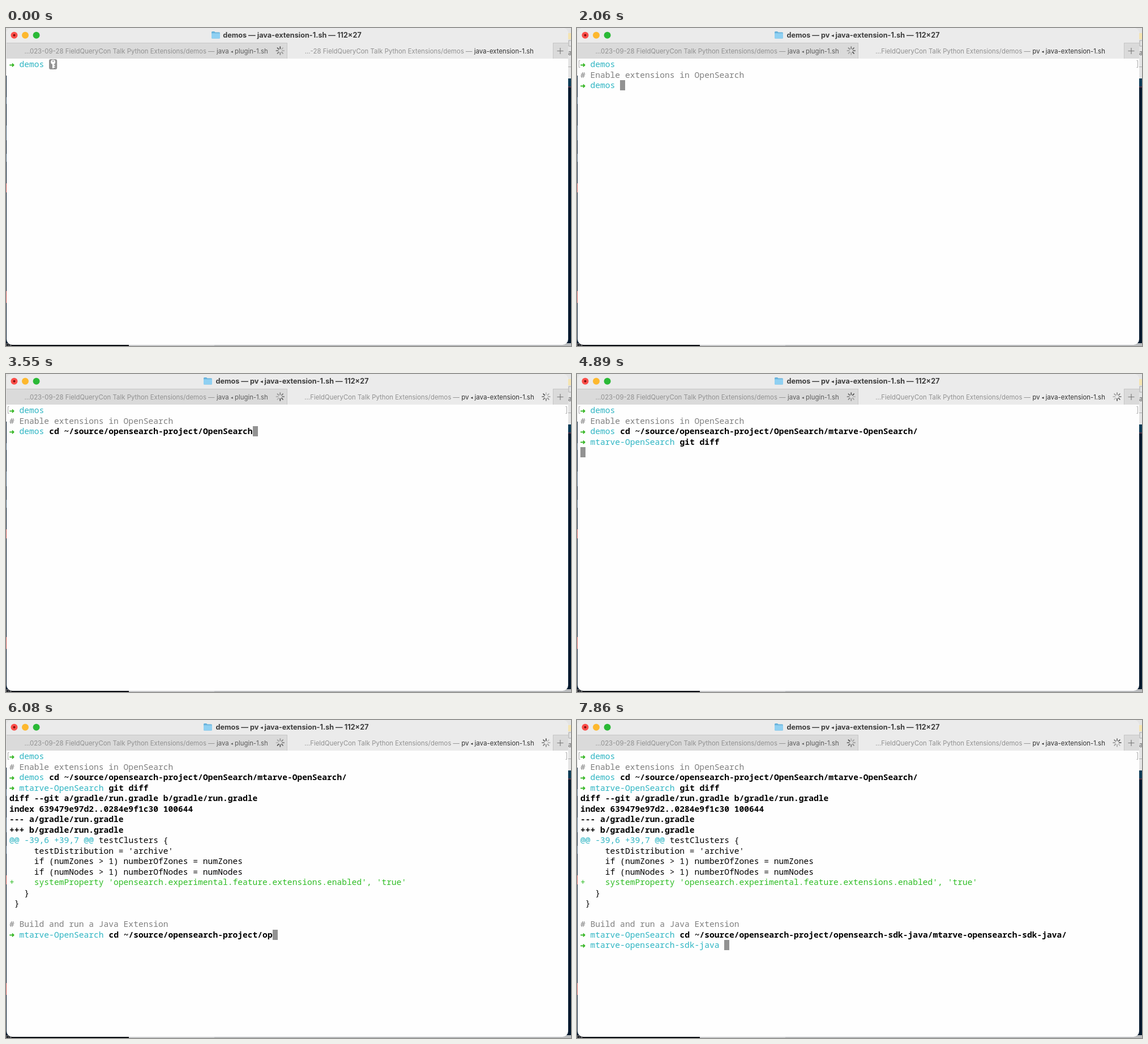
These frames come from a looping animation (998 by 561 pixels, 8000 ms). An HTML page:

```html
<!DOCTYPE html>
<html lang="en">
<head>
<meta charset="utf-8">
<title>Terminal demo</title>
<style>
  html, body { margin: 0; width: 100%; height: 100%; overflow: hidden; }
  svg { display: block; width: 100%; height: 100%; }
  text { white-space: pre; }
  .title { font: 700 12.65px Inter, sans-serif; fill: #3d3d3d; text-anchor: middle; }
  .tab { font: 11.4px Inter, sans-serif; fill: #5c5c5c; }
  .active { fill: #333; }
  .path { fill: #919191; text-anchor: end; }
  .small { font-size: 66%; }
  .term { font: 500 14.617px "Noto Sans Mono", monospace; fill: #000; }
  .arrow { font: 11.6px "DejaVu Sans", sans-serif; fill: #2fb41d; stroke: #2fb41d; stroke-width: 0.3; }
  .term.bold { font-weight: 700; }
  .term.cyan { fill: #2eb5c3; }
  .term.green { fill: #2fbd25; }
  .term.gray { fill: #7f7f7f; }
</style>
</head>
<body>
<svg viewBox="0 0 998 561">
  <!-- desktop behind the window -->
  <rect width="998" height="561" fill="#02182d"/>
  <path d="M0 0H12V84H0zM980 0H998V89H980z" fill="#e4e4e4"/>
  <path d="M993 9H998V20H993z" fill="#f5e4b0"/>
  <path d="M998 22H994V32H998M993 68.5H998" fill="none" stroke="#aaa"/>
  <text class="tab" x="993" y="48">a</text>
  <rect x="993" y="89" width="5" height="14" fill="#0b3a55"/>
  <path d="M993 104H998" stroke="#a04a60"/>
  <path d="M0 274h2v16h-2zM0 464h2v21h-2z" fill="#c85a55"/>
  <path d="M0 122h2v12h-2zM0 172h2v26h-2zM0 222h2v14h-2z" fill="#48627a"/>
  <rect y="556" width="217" height="5" fill="#06090f"/>
  <path d="M217 556H998V561H217z" fill="#c9cacc"/>
  <path d="M368 556H998V561H368z" fill="#b9bbbd"/>
  <text x="0" y="561" font-size="9" font-family="Inter, sans-serif" fill="#aaa">ns</text>

  <!-- window -->
  <clipPath id="frame"><rect x="1" width="992" height="559" rx="10"/></clipPath>
  <g clip-path="url(#frame)">
    <rect width="994" height="559" fill="#fefefe"/>
    <rect width="994" height="54" fill="#ebebeb"/>
    <path d="M0 26H497V54H0zM966 26H994V54H966z" fill="#dadada"/>
    <path d="M0 26.5H497M966 26.5H994M496.5 26V54M966.5 26V54" stroke="#c6c6c6" fill="none"/>
  </g>
  <circle cx="14.5" cy="12.8" r="6" fill="#fb4e4a"/>
  <circle cx="14.5" cy="12.8" r="2" fill="#7d0c0a"/>
  <circle cx="34" cy="12.8" r="6" fill="#fdb82e"/>
  <circle cx="53.6" cy="12.8" r="6" fill="#2ab936"/>
  <path d="M973.5 40.5H984.5M979 35V46" stroke="#777" stroke-width="1.1"/>

  <g id="folder">
    <path d="M0 7.5Q0 6 1.5 6H5l1.6 1.6H13.5q1.5 0 1.5 1.5V17q0 1.5-1.5 1.5H1.5Q0 18.5 0 17z" fill="#69b3dc"/>
    <path d="M0 9.3H15V17q0 1.5-1.5 1.5H1.5Q0 18.5 0 17z" fill="#8fd0f2"/>
  </g>
  <text class="title" id="title" x="505.5" y="17"></text>
  <text class="tab path" x="368.5" y="44.5">…023-09-28 FieldQueryCon Talk Python Extensions/demos —</text>
  <text class="tab" x="372" y="44.5">java <tspan class="small" dy="-1">◂</tspan><tspan dy="1"> plugin-1.sh</tspan></text>
  <text class="tab path" id="tabPath" y="44.5"></text>
  <text class="tab active" id="tabName" y="44.5"></text>
  <g id="spinners" stroke="#4c4c4c" stroke-width="1.7" stroke-linecap="round"></g>

  <path id="marks" d="M5.5 57.5H3.5V69.5H5.5M988.5 57.5H990.5V69.5H988.5" fill="none" stroke="#a8a8a8"/>
  <rect id="cursor" fill="#929292"/>
  <g id="key">
    <path d="M82 63H84.5V65H86.5V67H84.5V68.2H86.5V70H84.5L83.2 71.5L82 70.5z" fill="#fff"/>
    <circle cx="83.2" cy="60" r="4" fill="#fff"/>
    <circle cx="83.2" cy="58.4" r="1.2" fill="#929292"/>
  </g>
  <g id="screen"></g>
</svg>
<script>
const LOOP = 8000, STEP = 148.2;
const CELL = 8.77, LINE = 18.5, LEFT = 6, TOP = 55;
const $ = id => document.getElementById(id);

const span = (cls, text) => ({ cls, text });
const typed = (text, start, rate) => ({ cls: 'bold', text, start, rate });
const prompt = (from, dir, command) =>
  ({ from, arrow: true, spans: [span('cyan', dir + ' '), ...(command ? [command] : [])] });
const output = (from, cls, text) => ({ from, spans: [span(cls, text)] });

const DIFF = 35;
const rows = [
  prompt(0, 'demos'),
  output(10, 'gray', '# Enable extensions in OpenSearch'),
  prompt(11, 'demos', typed('cd ~/source/opensearch-project/OpenSearch/mtarve-OpenSearch/', 14.06, 4.125)),
  prompt(29, 'mtarve-OpenSearch', typed('git diff', 30.5, 4.125)),
  output(DIFF, 'bold', 'diff --git a/gradle/run.gradle b/gradle/run.gradle'),
  output(DIFF, 'bold', 'index 639479e97d2..0284e9f1c30 100644'),
  output(DIFF, 'bold', '--- a/gradle/run.gradle'),
  output(DIFF, 'bold', '+++ b/gradle/run.gradle'),
  { from: DIFF, spans: [span('cyan', '@@ -39,6 +39,7 @@'), span('', ' testClusters {')] },
  output(DIFF, '', "     testDistribution = 'archive'"),
  output(DIFF, '', '     if (numZones > 1) numberOfZones = numZones'),
  output(DIFF, '', '     if (numNodes > 1) numberOfNodes = numNodes'),
  output(DIFF, 'green', "+    systemProperty 'opensearch.experimental.feature.extensions.enabled', 'true'"),
  output(DIFF, '', '   }'),
  output(DIFF, '', ' }'),
  output(DIFF, '', ''),
  output(DIFF, 'gray', '# Build and run a Java Extension'),
  prompt(DIFF, 'mtarve-OpenSearch',
    typed('cd ~/source/opensearch-project/opensearch-sdk-java/mtarve-opensearch-sdk-java/', 35.92, 6.5)),
  prompt(49, 'mtarve-opensearch-sdk-java')
];

const escape = s => s.replace(/&/g, '&amp;').replace(/</g, '&lt;').replace(/>/g, '&gt;');

function visibleText(part, tick) {
  if (part.start === undefined) return part.text;
  const count = Math.round((tick - part.start) * part.rate);
  return part.text.slice(0, Math.max(0, count));
}

function drawScreen(tick) {
  let html = '', cursorRow = 0, cursorCol = 0;
  rows.forEach((row, i) => {
    if (tick < row.from) return;
    const y = TOP + 14.3 + i * LINE;
    let col = row.arrow ? 2 : 0;
    if (row.arrow) html += `<text class="arrow" x="${LEFT - 0.4}" y="${y - 0.6}">➜</text>`;
    for (const part of row.spans) {
      const text = visibleText(part, tick);
      html += `<text class="term ${part.cls}" x="${LEFT + col * CELL}" y="${y}">${escape(text)}</text>`;
      col += text.length;
    }
    cursorRow = i;
    cursorCol = col;
  });
  // Enter has been pressed and the command is still running
  if (tick >= 33 && tick < DIFF) { cursorRow = 4; cursorCol = 0; }

  const locked = tick < 10;
  const cursor = $('cursor');
  cursor.setAttribute('x', Math.round(LEFT + cursorCol * CELL));
  cursor.setAttribute('y', Math.round(TOP + cursorRow * LINE));
  cursor.setAttribute('width', locked ? 14.2 : 9);
  cursor.setAttribute('height', 18);
  cursor.setAttribute('rx', locked ? 3 : 0);
  $('key').style.display = locked ? '' : 'none';
  $('marks').style.display = tick >= 4 ? '' : 'none';
  $('screen').innerHTML = html;
}

function drawHeader(tick) {
  const running = tick >= 5 && tick !== 10;
  const process = 'pv <tspan class="small" dy="-1">◂</tspan><tspan dy="1"> </tspan>';
  const name = (running ? process : '') + 'java-extension-1.sh';
  $('title').innerHTML = `demos — ${name} — 112×27`;
  $('folder').setAttribute('transform', `translate(${running ? 349 : 363})`);
  $('tabPath').textContent = `…${running ? '' : '-28 '}FieldQueryCon Talk Python Extensions/demos —`;
  $('tabPath').setAttribute('x', running ? 801 : 823.5);
  $('tabName').innerHTML = name;
  $('tabName').setAttribute('x', running ? 804.5 : 827);
}

function spinner(cx, cy, phase) {
  let html = '';
  for (let i = 0; i < 8; i++) {
    const age = ((phase - i) % 8 + 8) % 8;
    html += `<path d="M0-3.6V-6.9" opacity="${1 - age * 0.1}" transform="translate(${cx} ${cy}) rotate(${i * 45})"/>`;
  }
  return html;
}

function drawSpinners(tick) {
  const phase = Math.floor(tick * 1.5);
  $('spinners').innerHTML = spinner(484.3, 40, phase) + (tick >= 18 ? spinner(954, 40, phase + 3) : '');
}

let shown = -1;
function render() {
  const tick = Math.min(53, Math.floor((performance.now() % LOOP + 8) / STEP));
  if (tick !== shown) {
    shown = tick;
    drawHeader(tick);
    drawSpinners(tick);
    drawScreen(tick);
  }
  requestAnimationFrame(render);
}
render();
</script>
</body>
</html>
```
